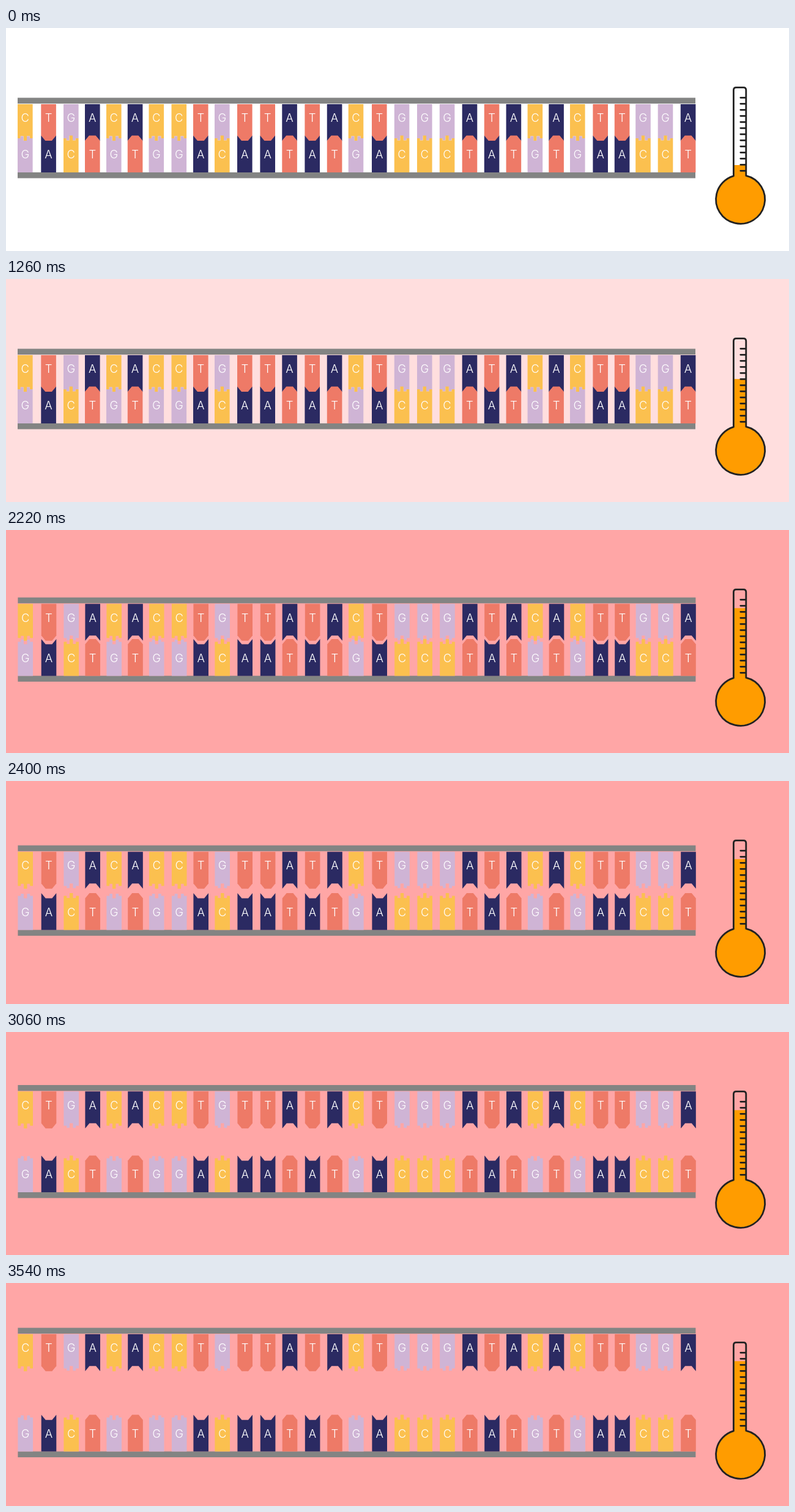
Animation, 1280 px wide and 366 px high, one loop 4800 ms. Source, as an HTML page with a canvas:

```html
<!DOCTYPE html>
<html lang="en">
<head>
<meta charset="utf-8">
<title>DNA denaturation</title>
<style>
html, body { margin: 0; width: 100%; height: 100%; overflow: hidden; }
canvas { display: block; }
</style>
</head>
<body>
<canvas id="stage" width="1280" height="366"></canvas>
<script>
const ctx = document.getElementById('stage').getContext('2d');
const LOOP = 4800, STEP = 60;
const HEAT_START = 540, LEVEL_END = 1685, HEAT_END = 2100;
const SPLIT_START = 2110, SPLIT_END = 3540, SPLIT_SPEED = 0.02815;

const sequence = 'CTGACACCTGTTATACTGGGATACACTTGGA';
const complement = { A: 'T', T: 'A', C: 'G', G: 'C' };
const lefts = [19, 57.3, 94, 129, 164, 198.8, 233.5, 270.5, 306, 341, 378, 415.4, 451.3, 488.4,
  524.8, 559.7, 598, 634.8, 672, 708.8, 745.7, 781.8, 817.6, 852.6, 887.3, 922, 959.4, 994.8,
  1029.2, 1065.7, 1102.8];
const colors = { A: '#2b2a62', T: '#ee7a67', C: '#fbc04f', G: '#cfb4d5' };
const WIDTH = 24.6;

// Joining edges as [x, y] pairs; y runs from the far tip (0) towards the tile body.
const edges = {
  T: [[0, 8.5], [7, 0], [17.6, 0], [WIDTH, 8.5]],
  A: [[0, 0], [7, 8.5], [17.6, 8.5], [WIDTH, 0]],
  C: crown(4.5, 8, 0),
  G: crown(4.5, 1, 8.5)
};

function crown(side, flank, middle) {
  return [[0, side], [4.8, side], [4.8, flank], [9.6, flank], [9.6, middle],
    [15, middle], [15, flank], [19.8, flank], [19.8, side], [WIDTH, side]];
}

const progress = (t, from, to) => Math.min(1, Math.max(0, (t - from) / (to - from)));

function drawTile(base, left, backY, tipY) {
  const inward = Math.sign(backY - tipY);
  ctx.fillStyle = colors[base];
  ctx.beginPath();
  ctx.moveTo(left, backY);
  for (const [x, y] of edges[base]) ctx.lineTo(left + x, tipY + inward * y);
  ctx.lineTo(left + WIDTH, backY);
  ctx.fill();
}

function drawStrand(bases, dx, dy, barY, backY, tipY, baseline) {
  ctx.save();
  ctx.translate(dx, dy);
  ctx.fillStyle = '#838483';
  ctx.fillRect(19, barY, 1108, 9.6);
  ctx.font = '300 18.5px Inter, Lato, sans-serif';
  ctx.textAlign = 'center';
  bases.forEach((base, i) => {
    drawTile(base, lefts[i], backY, tipY);
    ctx.fillStyle = '#fff';
    ctx.fillText(base, lefts[i] + WIDTH / 2, baseline);
  });
  ctx.restore();
}

function drawThermometer(level) {
  ctx.fillStyle = '#ff9c00';
  ctx.fillRect(1190, level, 19, 250 - level);
  ctx.beginPath();
  ctx.arc(1200.6, 281.3, 40, 0, Math.PI * 2);
  ctx.fill();

  ctx.strokeStyle = '#222';
  ctx.lineWidth = 2.8;
  ctx.lineCap = ctx.lineJoin = 'round';
  ctx.beginPath();
  ctx.moveTo(1189.4, 242.8);
  ctx.lineTo(1189.4, 102);
  ctx.quadraticCurveTo(1189.4, 97.6, 1193.5, 97.6);
  ctx.lineTo(1205.7, 97.6);
  ctx.quadraticCurveTo(1209.8, 97.6, 1209.8, 102);
  ctx.lineTo(1209.8, 242.4);
  ctx.arc(1200.6, 281.3, 40, -1.338, -1.854);
  for (let y = 114.3; y < 240; y += 10) {
    ctx.moveTo(1200.8, y);
    ctx.lineTo(1209, y);
  }
  ctx.stroke();
}

const topBases = [...sequence];
const bottomBases = topBases.map(base => complement[base]);

function draw(now) {
  const t = Math.floor(now % LOOP / STEP) * STEP;
  const shade = 255 - 89 * progress(t, HEAT_START, HEAT_END) ** 1.3;
  ctx.fillStyle = `rgb(255, ${Math.round(shade)}, ${Math.round(shade)})`;
  ctx.fillRect(0, 0, 1280, 366);

  const gap = SPLIT_SPEED * Math.max(0, Math.min(t, SPLIT_END) - SPLIT_START);
  const dx = gap ? 0.4 : 0, rise = gap ? 0.7 : 0;
  drawStrand(topBases, dx, -gap - rise, 114.5, 125, 185.6, 154.3);
  drawStrand(bottomBases, dx, gap - rise, 236.9, 237, 176.6, 214.4);
  drawThermometer(225 - 96.7 * progress(t, HEAT_START, LEVEL_END));
  requestAnimationFrame(() => draw(performance.now() - start));
}

const start = performance.now();
draw(0);
</script>
</body>
</html>
```
